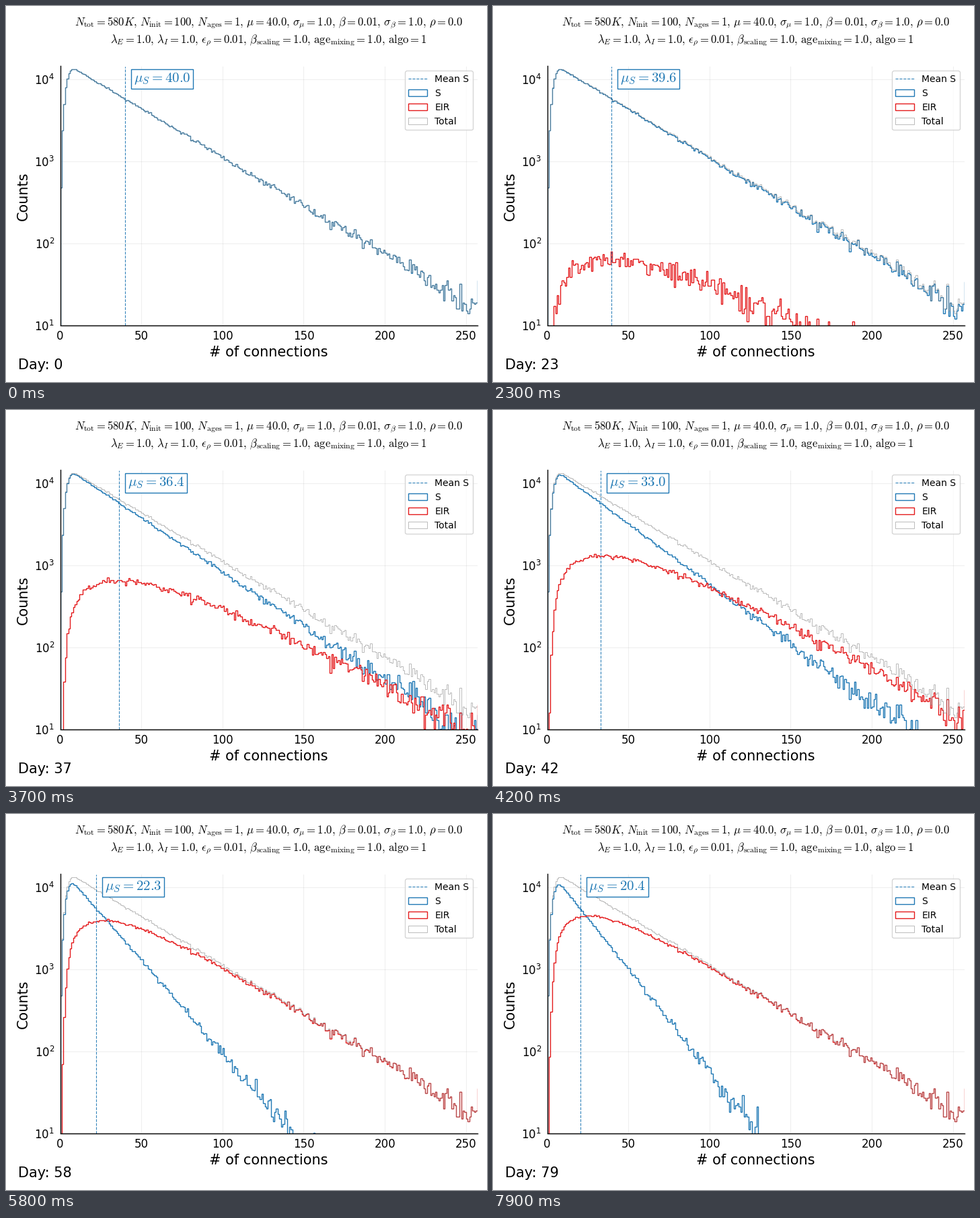
A matplotlib script for the animation above (8 s loop, 715x559 px).

```python
import matplotlib.pyplot as plt
import numpy as np
from matplotlib.animation import FuncAnimation
from matplotlib.lines import Line2D
from matplotlib.patches import Patch

W, H, DPI = 715, 559, 100
DAYS = 80
BLUE, RED, GREY = "#1f78b4", "#e41a1c", "grey"
K_MAX = 257
k = np.arange(K_MAX + 1)
rng = np.random.default_rng(7)


def make_total():
    """Contact histogram: quick rise, exponential tail, counting noise."""
    rise = 1 - np.exp(-(0.222 * (k + 0.75)) ** 2)
    counts = rng.poisson(17100 * rise * np.exp(-0.0273 * k))
    counts[-1] = 35  # overflow bin at the right edge
    return counts


def hazard(day):
    """Cumulative infection pressure per contact, a logistic curve."""
    return 0.0299 / (1 + np.exp(-0.178 * (day - 49.3)))


def mean_s(day):
    h = hazard(day)
    return 3.766 - 25.4 * h + 1 / (0.0276 + h)


def simulate(total):
    """Susceptible counts per day; each day thins the previous one."""
    rows, alive, before = [], total, 0.0
    for day in range(DAYS):
        now = hazard(day)
        alive = rng.binomial(alive, np.exp(-k * (now - before)))
        rows.append(alive)
        before = now
    return rows


total = make_total()
susceptible = simulate(total)

fig = plt.figure(figsize=(W / DPI, H / DPI), dpi=DPI, facecolor="white")
left, right, top, bottom = 80.5, 700.7, 89.5, 474.5
ax = fig.add_axes([left / W, 1 - bottom / H, (right - left) / W, (bottom - top) / H])
ax.set_yscale("log")
ax.set_xlim(0, K_MAX)
ax.set_ylim(10, 14570)
ax.set_xticks(range(0, 251, 50))
ax.minorticks_off()
ax.tick_params(length=0, pad=6, labelsize=12)
ax.tick_params(axis="x", pad=5.6)
ax.grid(True, color="#b0b0b0", alpha=0.2, lw=0.8)
ax.set_axisbelow(True)
ax.spines[["top", "right"]].set_visible(False)
ax.spines[["left", "bottom"]].set_linewidth(1)


def label(x, y, s, **kw):
    return fig.text(x / W, 1 - y / H, s, **kw)


def params(*items):
    return "$" + r",\,".join(items) + "$"


title = dict(size=12, ha="center", va="baseline", math_fontfamily="cm")
label(390.5, 29.4, params(
    r"N_\mathrm{tot}=580K", r"N_\mathrm{init}=100", r"N_\mathrm{ages}=1",
    r"\mu=40.0", r"\sigma_\mu=1.0", r"\beta=0.01", r"\sigma_\beta=1.0",
    r"\rho=0.0"), **title)
label(390.5, 55.4, params(
    r"\lambda_E=1.0", r"\lambda_I=1.0", r"\epsilon_\rho=0.01",
    r"\beta_\mathrm{scaling}=1.0", r"\mathrm{age}_\mathrm{mixing}=1.0",
    r"\mathrm{algo}=1"), **title)
label(390.5, 521, "# of connections", size=15, ha="center", va="baseline")
label(32, 283, "Counts", size=15, rotation=90, rotation_mode="anchor",
      ha="center", va="baseline")
day_text = label(18, 540, "", size=15, va="baseline")


def steps(counts, color, lw, z, alpha=1):
    edges = np.arange(len(counts) + 1)
    return ax.stairs(np.maximum(counts, 0.5), edges, baseline=0.5, color=color,
                     lw=lw, alpha=alpha, zorder=z)


s_hist = steps(total, BLUE, 1, 2)
eir_hist = steps(total * 0, RED, 1, 2.1)
steps(total[:K_MAX], GREY, 0.5, 2.2, alpha=0.75)

dash = dict(color=BLUE, lw=0.8, ls="--", alpha=0.9)
mean_line = ax.axvline(40, zorder=2.3, **dash)
mean_text = ax.text(0, 0.951, "", transform=ax.get_xaxis_transform(),
                    size=15, color=BLUE, va="center", math_fontfamily="cm",
                    bbox=dict(boxstyle="square,pad=0.17", fc="white", ec=BLUE, lw=1),
                    zorder=4)


def box(color, name, **kw):
    return Patch(fill=False, edgecolor=color, label=name, **kw)


ax.legend(handles=[Line2D([], [], label="Mean S", **dash),
                   box(BLUE, "S", lw=1), box(RED, "EIR", lw=1),
                   box(GREY, "Total", lw=0.5, alpha=0.75)],
          loc="upper right", fontsize=10)


def update(day):
    s, mu = susceptible[day], mean_s(day)
    s_hist.set_data(np.maximum(s, 0.5))
    eir_hist.set_data(np.maximum(total - s, 0.5))
    mean_line.set_xdata([mu, mu])
    mean_text.set_x(mu + 5.2)
    mean_text.set_text(rf"$\mu_S={mu:.1f}$")
    day_text.set_text(f"Day: {day}")
    return s_hist, eir_hist, mean_line, mean_text, day_text


anim = FuncAnimation(fig, update, frames=DAYS, interval=100, repeat=True,
                     repeat_delay=0, blit=False)
plt.show()
```
